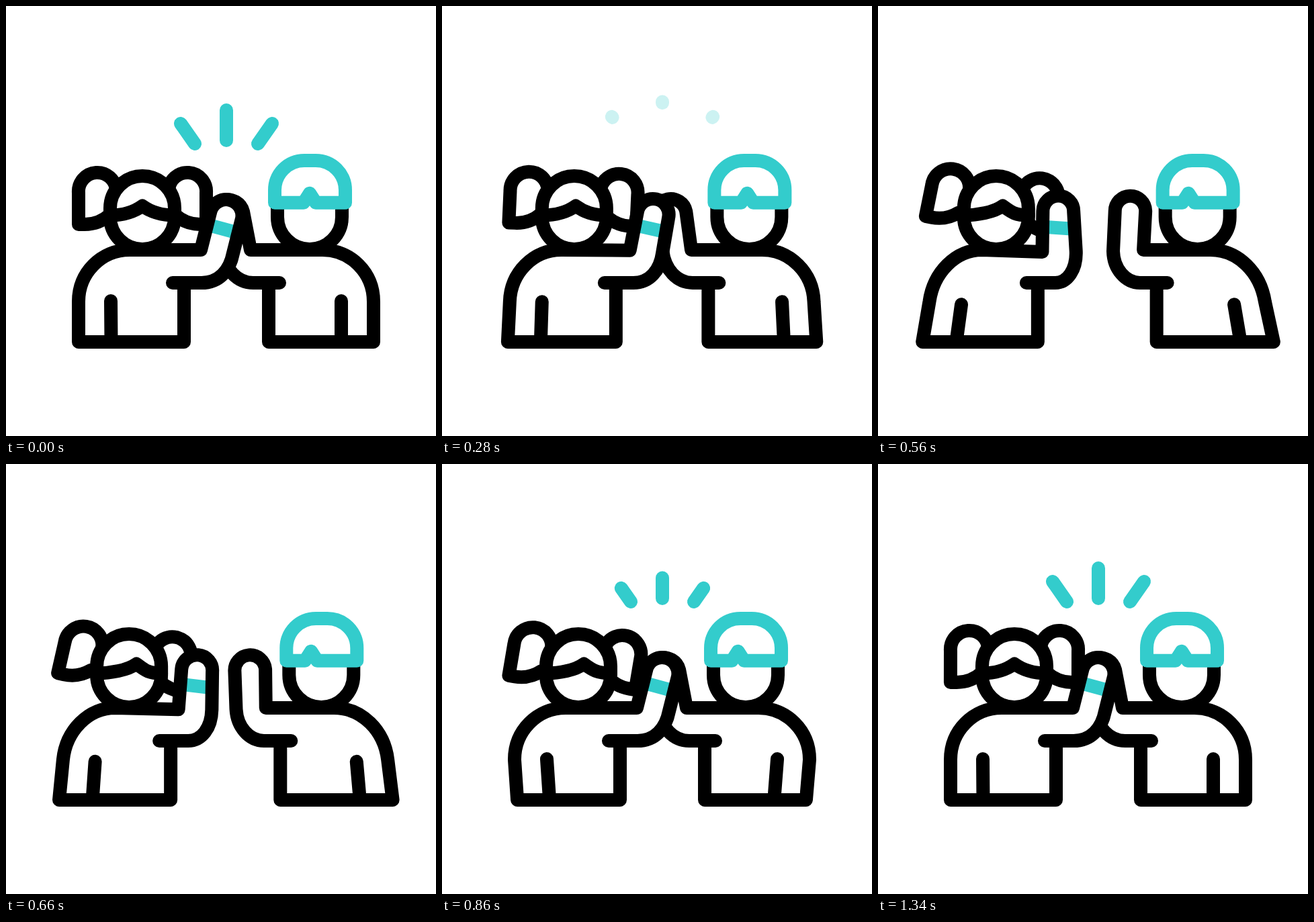
Write an HTML page that moves like this. It is 640 px wide and 640 px high and loops after 1.6 s.

```html
<!DOCTYPE html>
<html lang="en">
<head>
<meta charset="utf-8">
<title>High five</title>
<style>
  html, body { margin: 0; height: 100%; overflow: hidden; background: #fff; }
  svg { display: block; width: 100vw; height: 100vh; }
  path { stroke: #000; stroke-width: 20; stroke-linecap: round; stroke-linejoin: round; fill: #fff; }
  .open { fill: none; }
  .teal { stroke: #3cc; }
  #band { stroke-linecap: butt; }
</style>
</head>
<body>
<svg viewBox="0 0 640 640">
  <g id="boy">
    <path d="M404 292V314A48 48 0 0 0 500 314V292"/>
    <path id="cap" class="teal"/>
    <path id="boyBody"/>
    <path id="boySleeve" class="open"/>
  </g>
  <g id="girl">
    <path id="tailL" d="M164 274A28 28 0 0 0 108 278V325H117Q139 325 155 310"/>
    <path id="tailR" d="M242 274A28 28 0 0 1 298 278V325H289Q267 325 251 310"/>
    <path d="M155 301A48 48 0 0 1 251 301V314A48 48 0 0 1 155 314Z"/>
    <path id="fringe" class="open"/>
    <path id="girlFill" style="stroke:none"/>
    <path id="band" class="open teal"/>
    <path id="girlBody" class="open"/>
    <path id="girlSleeve" class="open"/>
  </g>
  <g id="rays">
    <path class="teal"/><path class="teal"/><path class="teal"/>
  </g>
</svg>
<script>
const LOOP = 1600, APART = 600, CLAP = 865;
const $ = id => document.getElementById(id);
const draw = (id, d) => $(id).setAttribute('d', d);
const move = (id, value) => $(id).setAttribute('transform', value);
const span = (t, from, to) => Math.min(1, Math.max(0, (t - from) / (to - from)));
const smooth = u => u * u * (3 - 2 * u);
const mix = (a, b, k) => a + (b - a) * k;

// Outer end x/y, inner end x/y of each ray
const rays = [[260, 175, 281, 205], [328, 155, 328, 200], [396, 175, 375, 205]];

function drawRays(t) {
  const leaving = t < APART;
  const out = smooth(span(t, 60, 310)), grow = smooth(span(t, 700, 960));
  const opacity = leaving ? 1 - span(t, 190, 310) : span(t, 700, 820);
  $('rays').setAttribute('opacity', opacity);
  rays.forEach(([x, y, ix, iy], i) => {
    const length = Math.hypot(x - ix, y - iy);
    const at = s => `${x + (ix - x) * s / length} ${y + (iy - y) * s / length}`;
    const start = leaving ? -13 * out : length * (1 - grow);
    const end = leaving ? mix(length, -13, out) : length;
    $('rays').children[i].setAttribute('d', `M${at(start)}L${at(end)}`);
  });
}

function render(t) {
  const leave = span(t, 80, APART);
  const away = leave ** 1.7;
  const back = (1 - span(t, APART, CLAP)) ** 1.7;
  const p = t < APART ? away : back;                                    // bodies and arms
  const lag = t < APART ? away : 1 - smooth(span(t, APART, 1380));      // hair and goggles
  const hem = t < APART ? leave ** 1.5                                  // sleeves overshoot
    : t < CLAP ? mix(-.25, 1, back) : -.25 * (1 - smooth(span(t, CLAP, 1340)));
  const pt = (x0, y0, x1, y1) => `${mix(x0, x1, p)} ${mix(y0, y1, p)} `;

  move('girl', `translate(${-31 * p})`);
  move('tailL', `rotate(${13 * lag} 164 269)`);
  move('tailR', `rotate(${13 * lag} 227 269)`);
  const tip = 203 + 11.2 * lag;
  draw('fringe', `M155 311.5C175 311.5 ${tip - 13} 307 ${tip} 297.5C${tip + 13} 307 231 311.5 251 311.5`);
  const girl = `M265 412V500H${108 - 16.5 * hem}L${pt(108, 440, 103, 440)}`
    + `C${pt(108, 397, 110, 397)}142 363 ${pt(184, 363, 182, 363)}`
    + `L${pt(290, 363, 269, 366.5)}L${pt(304.5, 305.5, 268, 305)}`
    + `A1 1 0 0 1 ${pt(350.5, 318.5, 313.8, 304)}L${pt(338, 368, 319.6, 364.5)}`
    + `C${pt(333, 394, 321.5, 392)}${pt(317, 412, 308, 412)}291 412H248`;
  draw('girlFill', girl);
  draw('girlBody', girl);
  draw('band', `M${pt(298, 325, 268, 329)}L${pt(348, 338.5, 318, 331)}`);
  draw('girlSleeve', `M${pt(156, 439, 150.5, 445)}L${156.5 - 14.5 * hem} 500`);

  move('boy', `translate(${27 * p})`);
  const mark = 452 - 15.5 * lag;
  draw('cap', 'M400 292.7V274A44 44 0 0 1 444 230H461A44 44 0 0 1 505 274V292.7'
    + `H${mark + 9}L${mark} 278.7L${mark - 9} 292.7Z`);
  draw('boyBody', `M391 412V500H${547 + 20.5 * hem}L${pt(547, 440, 553, 440)}`
    + `C${pt(547, 397, 545, 397)}513 363 471 363`
    + `L${pt(364, 363, 372.5, 363)}L${pt(353, 306, 377.6, 305)}`
    + `A1 1 0 0 0 ${pt(307, 318, 332.2, 304)}L${pt(322, 365, 327, 365)}`
    + `C${pt(326, 392, 327, 391)}${pt(344, 412, 345, 412)}${pt(368, 412, 366, 412)}H407`);
  draw('boySleeve', `M${pt(499, 439, 507.5, 445)}L${499 + 19 * hem} 500`);

  drawRays(t);
}

function tick() {
  render(performance.now() % LOOP);
  requestAnimationFrame(tick);
}
tick();
</script>
</body>
</html>
```
